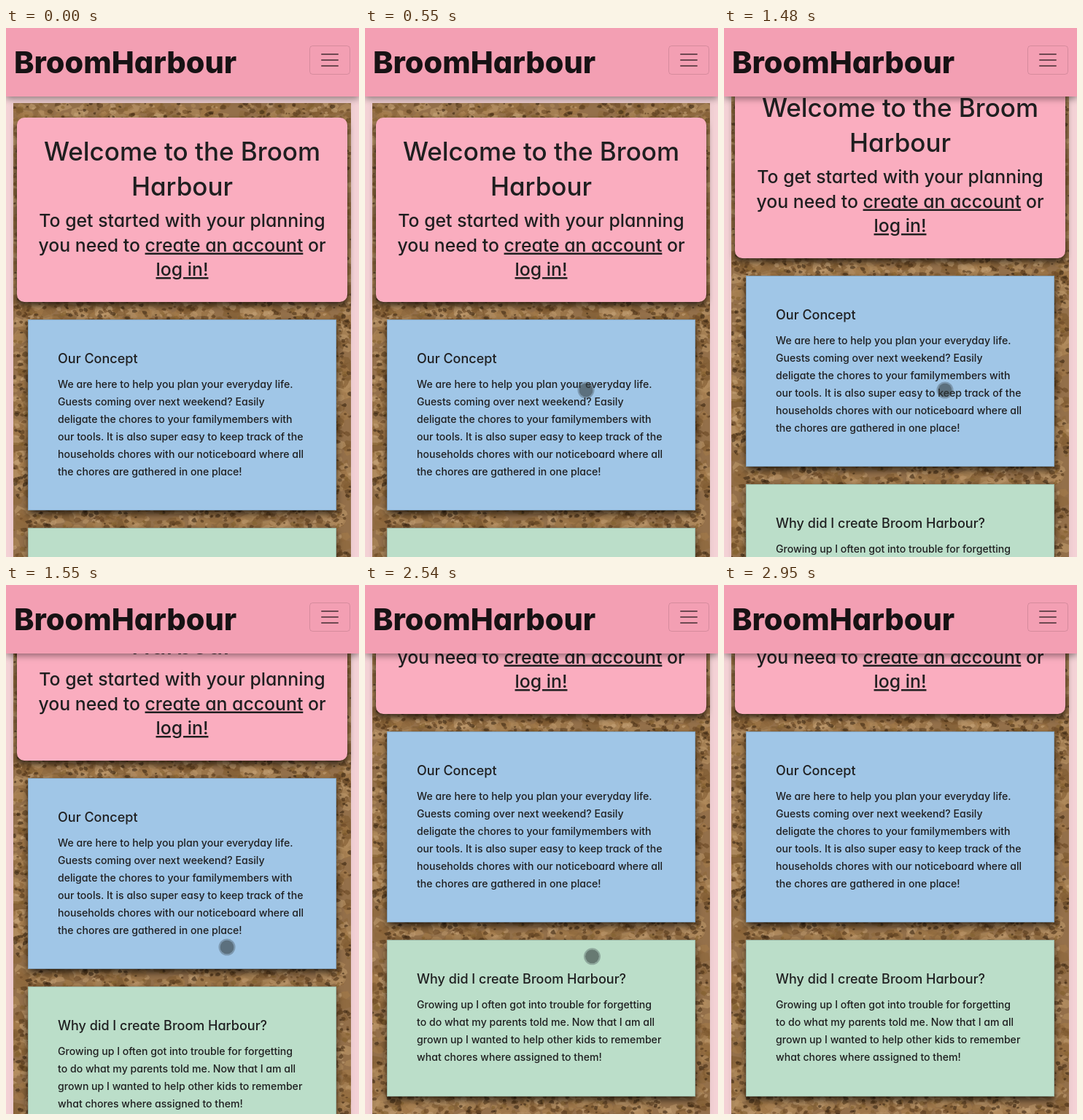
Recreate the animation shown at these times as an HTML page with a canvas. Size 484 px wide and 726 px high, loop 3300 ms.

```html
<!DOCTYPE html>
<html lang="en">
<head>
<meta charset="utf-8">
<title>Broom Harbour</title>
<style>
  html, body { margin: 0; width: 100%; height: 100%; overflow: hidden; background: #f4d2d6; }
  body { position: relative; }
  body * { position: absolute; box-sizing: border-box; }
  #page { left: 0; top: 0; width: 484px; height: 930px; }
  #cork { left: 10px; top: 103px; box-shadow: 0 0 9px rgba(0,0,0,.08); }
  .box { box-shadow: 0 5px 9px rgba(0,0,0,.65); }
  .hero { left: 15px; top: 123px; width: 453px; height: 253px; border-radius: 10px; background: #faadbf; }
  .card { left: 30px; width: 423px; border: 1px solid rgba(0,0,0,.16); }
  .blue { top: 400px; height: 262px; background: #a0c6e7; }
  .green { top: 686px; height: 215px; background: #bbdec9; }
  svg { left: 0; top: 0; overflow: visible; }
  text { font-family: Inter, Lato, sans-serif; font-weight: 500; font-optical-sizing: none;
    font-feature-settings: "cv11"; fill: #1f1f20; }
  .h1 { font-size: 35px; text-anchor: middle; }
  .h2 { font-size: 24.8px; text-anchor: middle; }
  .h3 { font-size: 18px; }
  .p { font-size: 14.1px; }
  .link { text-decoration: underline 2px; text-underline-offset: 3px; }
  .logo { font-size: 41.5px; font-weight: 800; fill: #171214; }
  nav { left: 0; top: 0; width: 484px; height: 94px; background: #f39fb3; box-shadow: 0 3px 9px rgba(0,0,0,.42); }
  #dot { left: -11.5px; top: -11.5px; width: 23px; height: 23px; border-radius: 50%;
    background: rgba(48,55,58,.6) padding-box; border: 2px solid rgba(60,70,75,.35); }
</style>
</head>
<body>
<div id="page">
  <canvas id="cork" width="463" height="827"></canvas>
  <div class="box hero"></div>
  <div class="box card blue"></div>
  <div class="box card green"></div>
  <svg id="copy" width="484" height="930"></svg>
</div>
<nav>
  <svg width="484" height="94" fill="none">
    <text class="logo" x="11" y="62">BroomHarbour</text>
    <rect x="416.5" y="24.5" width="55" height="39" rx="4" stroke="#000" stroke-opacity=".12"/>
    <path d="M433 36h22M433 44h22M433 52h22" stroke="#000" stroke-opacity=".55" stroke-width="2" stroke-linecap="round"/>
  </svg>
</nav>
<div id="dot"></div>
<script>
const $ = id => document.getElementById(id);

// Text blocks: class, x, first baseline, line height, lines
const link = s => `<tspan class="link">${s}</tspan>`;
const blocks = [
  ['h1', 241.5, 182, 48, ['Welcome to the Broom', 'Harbour']],
  ['h2', 241.5, 273, 33.5, ['To get started with your planning',
    `you need to ${link('create an account')} or`, link('log in!')]],
  ['h3', 71, 460, 24, ['Our Concept']],
  ['p', 71, 494, 24, ['We are here to help you plan your everyday life.',
    'Guests coming over next weekend? Easily',
    'deligate the chores to your familymembers with',
    'our tools. It is also super easy to keep track of the',
    'households chores with our noticeboard where all',
    'the chores are gathered in one place!']],
  ['h3', 71, 746, 24, ['Why did I create Broom Harbour?']],
  ['p', 71, 780, 24, ['Growing up I often got into trouble for forgetting',
    'to do what my parents told me. Now that I am all',
    'grown up I wanted to help other kids to remember',
    'what chores where assigned to them!']]
];
$('copy').innerHTML = blocks.map(([cls, x, y, step, lines]) => lines.map((line, i) =>
  `<text class="${cls}" x="${x}" y="${y + i * step}">${line}</text>`).join('')).join('');

// Cork board: broad chips, then light grains and dark crevices
let seed = 7;
const rnd = () => (seed = (seed * 16807) % 2147483647) / 2147483647;
const c = $('cork').getContext('2d');
c.fillStyle = '#94704a';
c.fillRect(0, 0, 463, 827);
function chips(count, size, colors) {
  for (let i = 0; i < count; i++) {
    const x = rnd() * 463, y = rnd() * 827, turn = rnd() * 6.3, r = size * (.5 + rnd());
    c.fillStyle = colors[Math.floor(rnd() * colors.length)];
    c.beginPath();
    for (let k = 0; k < 6; k++) {
      const a = turn + k * 1.05, d = r * (.5 + rnd() * .6);
      c.lineTo(x + Math.cos(a) * d * 1.3, y + Math.sin(a) * d);
    }
    c.fill();
  }
}
c.globalAlpha = .6;
chips(5000, 7, ['#b18a5c', '#a37a4a', '#8d673c', '#bd986a', '#7e5a30']);
chips(3200, 3.2, ['#573a1c', '#6a4824', '#c3a074', '#83602f']);
chips(1800, 2.6, ['#3a2612', '#4b3016']);
c.globalAlpha = 1;
c.filter = 'blur(0.7px)';
c.drawImage($('cork'), 0, 0);

// Motion advances in discrete steps
const ease = p => p * p * (3 - 2 * p);
const rest = [302.5, 496.5];
const enter = [391.5, 630], leave = [450.5, 720];
const mix = (a, b, p) => a.map((v, i) => v + (b[i] - v) * p);
const stepAt = (times, t) => times.filter(s => t >= s).length;
const enterAt = [260, 330, 400, 480, 550];
const leaveAt = [2540, 2610, 2680, 2740, 2810, 2880];
const scrollAt = [1410, 1480, 1550, 1610], scrollTo = [0, 6, 60, 135, 199];

function dotAt(t) {
  if (t < 260 || t >= 2950) return null;
  if (t < 2540) return mix(enter, rest, ease((stepAt(enterAt, t) - 1) / 4));
  return mix(rest, leave, ease((stepAt(leaveAt, t) - .15) / 5.85));
}

function draw(now) {
  const t = now % 3300, pos = dotAt(t);
  $('page').style.top = -scrollTo[stepAt(scrollAt, t)] + 'px';
  $('dot').style.display = pos ? 'block' : 'none';
  if (pos) $('dot').style.transform = `translate(${pos[0]}px, ${pos[1]}px)`;
}
const start = performance.now();
function tick() {
  draw(performance.now() - start);
  requestAnimationFrame(tick);
}
tick();
</script>
</body>
</html>
```
